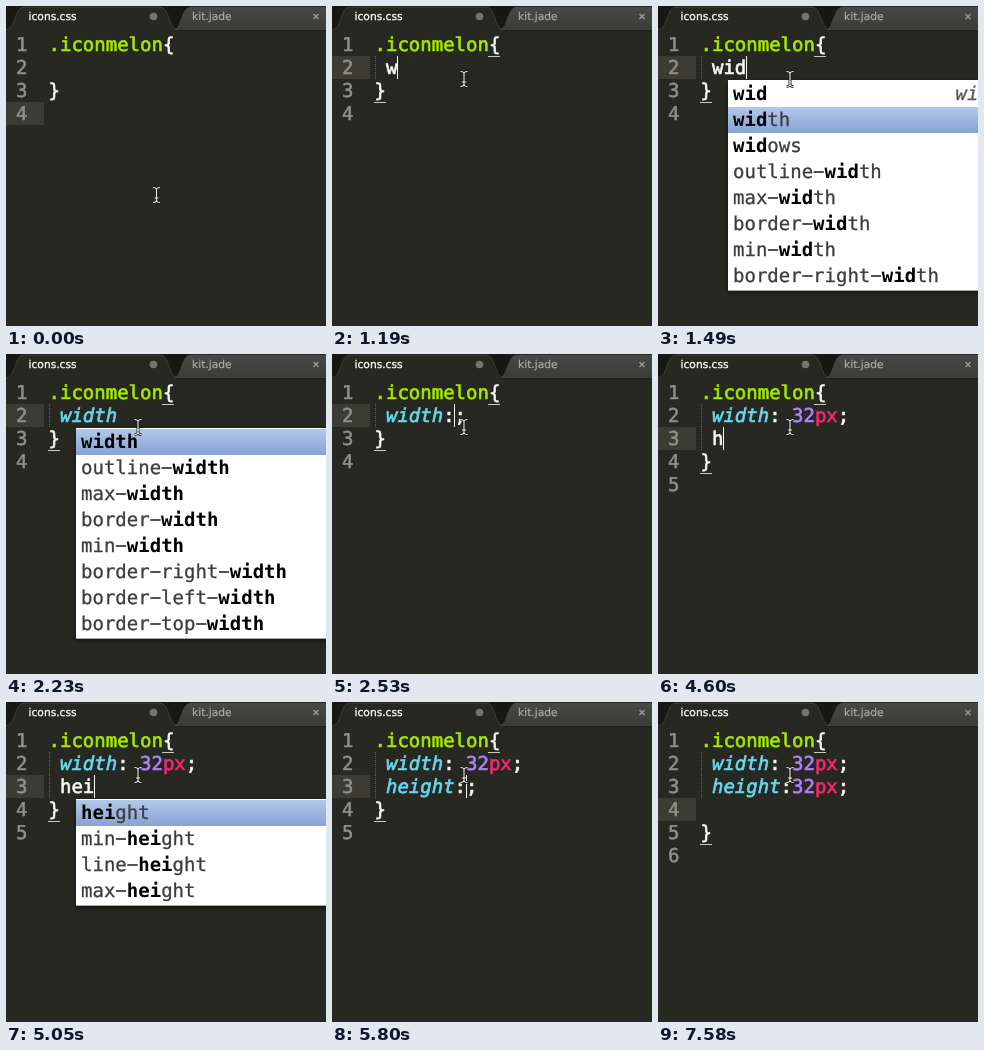
An HTML page that plays this animation: 320x320 px, repeating every 8000 ms.

```html
<!DOCTYPE html>
<html lang="en">
<head>
<meta charset="utf-8">
<title>Typing CSS</title>
<style>
  html, body { margin: 0; width: 100%; height: 100%; overflow: hidden; background: #272822; }
  svg { display: block; width: 100vw; height: 100vh; }
  text { white-space: pre; text-rendering: geometricPrecision; }
  .mono { font-family: "DejaVu Sans Mono", monospace; font-size: 19px; }
  .tab { font-family: "DejaVu Sans", sans-serif; font-size: 10.7px; }
</style>
</head>
<body>
<svg viewBox="0 0 320 320">
  <defs>
    <linearGradient id="idle" x2="0" y2="1">
      <stop offset="0" stop-color="#484946"/><stop offset="1" stop-color="#3b3c38"/>
    </linearGradient>
    <linearGradient id="pick" x2="0" y2="1">
      <stop offset="0" stop-color="#b1c8e9"/><stop offset="1" stop-color="#86a3d4"/>
    </linearGradient>
    <filter id="shade" x="-10%" y="-10%" width="120%" height="130%">
      <feDropShadow dx="0" dy="2" stdDeviation="2.5" flood-color="#000" flood-opacity=".6"/>
    </filter>
    <path id="beam" d="M-3.5 -7.5Q0 -7.5 0 -5V5Q0 7.5 -3.5 7.5M3.5 -7.5Q0 -7.5 0 -5M3.5 7.5Q0 7.5 0 5M-2 3H2"/>
  </defs>
  <rect width="320" height="320" fill="#272822"/>
  <rect width="320" height="24" fill="#171714"/>
  <path d="M168 24C176 23 175 1 185 1H320V24Z" fill="url(#idle)" stroke="#50514b" stroke-width=".6"/>
  <path d="M168 24.5H320" stroke="#1b1b18"/>
  <path d="M0 25C10 23 8 1 18 1H154C164 1 162 23 172 25Z" fill="#272822"/>
  <path d="M0 24C10 23 8 1 18 1H154C164 1 162 23 172 24" fill="none" stroke="#4a4b45" stroke-width=".7"/>
  <text class="tab" x="22.5" y="14" fill="#fff" stroke="#fff" stroke-width=".3">icons.css</text>
  <text class="tab" x="186" y="14" fill="#a9aaa5" stroke="#a9aaa5" stroke-width=".2">kit.jade</text>
  <circle cx="147.5" cy="10.5" r="3.8" fill="#74756f"/>
  <path d="M307.5 8l5 5m0-5l-5 5" stroke="#9a9b95" stroke-width="1.4"/>
  <g id="editor"></g>
  <g id="popup"></g>
  <g id="mouse" fill="none">
    <use href="#beam" stroke="#111" stroke-width="2.6"/>
    <use href="#beam" stroke="#f4f4f0" stroke-width="1.1"/>
  </g>
</svg>
<script>
const LOOP = 8000, ADV = 11.44, LEFT = 42.5, LINE = 23, TOP = 27, BASE = 18, ROW = 26;
const OPEN = ".iconmelon{", WIDTH = " width: 32px;";
const editor = document.getElementById("editor");
const popup = document.getElementById("popup");
const mouse = document.getElementById("mouse");

const widthList = ["width", "outline-width", "max-width", "border-width", "min-width",
  "border-right-width", "border-left-width", "border-top-width"];
const widList = ["wid", "width", "widows", ...widthList.slice(1, 6)];
const heightList = ["height", "min-height", "line-height", "max-height"];
const heList = [...heightList, "white-space", "pitch-range", "speech-rate", "richness"];

// Each step changes only the listed fields; caret is [row, column].
const steps = [
  [0, { rows: [OPEN, "", "}", ""], caret: [3, 0], blink: 0, braces: false, mouse: [150.5, 189], menu: null }],
  [140, { mouse: [132, 73] }],
  [290, { caret: [1, 1], blink: 1, braces: true }],
  [740, { blink: .5 }],
  [890, { blink: 0 }],
  [1190, line2(" w", 2)],
  [1490, { ...line2(" wid", 4), ...menu(widList, "wid", 1) }],
  [1790, { ...line2(" widt", 5), ...menu(widthList, "widt") }],
  [1940, { ...line2(" width", 6), ...menu(widthList, "width") }],
  [2230, { blink: 0 }],
  [2530, { ...line2(" width:;", 7), menu: null }],
  [2830, line2(" width: ;", 8)],
  [2980, line2(" width: 3;", 9)],
  [3130, line2(" width: 32;", 10)],
  [3420, line2(" width: 32p;", 11)],
  [3570, line2(WIDTH, 12)],
  [3720, line2(WIDTH, 13)],
  [4010, { blink: 0 }],
  [4160, line3("", 1)],
  [4450, { blink: 0 }],
  [4600, line3(" h", 2)],
  [4750, { ...line3(" he", 3), ...menu(heList, "he") }],
  [5050, { ...line3(" hei", 4), ...menu(heightList, "hei") }],
  [5200, { ...line3(" heig", 5), ...menu(heightList, "heig") }],
  [5350, { ...line3(" height", 7), ...menu(heightList, "height") }],
  [5650, { ...line3(" height:", 8), menu: null }],
  [5800, line3(" height:;", 8)],
  [6100, line3(" height:3;", 9)],
  [6250, line3(" height:32;", 10)],
  [6540, line3(" height:32p;", 11)],
  [6690, line3(" height:32px;", 12)],
  [6840, line3(" height:32px;", 13)],
  [7130, { blink: 0 }],
  [7280, { rows: [OPEN, WIDTH, " height:32px;", "", "}", ""], caret: [3, 1], blink: 1 }],
  [7580, { blink: 0 }]
];

function line2(text, col) {
  return { rows: [OPEN, text, "}", ""], caret: [1, col], blink: 1 };
}

function line3(text, col) {
  return { rows: [OPEN, WIDTH, text, "}", ""], caret: [2, col], blink: 1 };
}

function menu(list, query, picked = 0) {
  return { menu: { list, query, picked } };
}

function rect(x, y, w, h, fill, extra = "") {
  return `<rect x="${x}" y="${y}" width="${w}" height="${h}" fill="${fill}" ${extra}/>`;
}

function mono(x, y, str, fill, weight = 0, extra = "") {
  return `<text class="mono" x="${x}" y="${y}" fill="${fill}" stroke="${fill}" stroke-width="${weight}" ${extra}>${str}</text>`;
}

function tokenStyle(token) {
  if (token[0] === ".") return ["#a6e800"];
  if (/^(width|height)$/.test(token)) return ["#66d9ef", 'font-style="italic"'];
  if (/^\d/.test(token)) return ["#ae81ff"];
  if (token === "px") return ["#f92672"];
  return ["#f8f8f2"];
}

function drawCode(text, y) {
  return [...text.matchAll(/\.\w+|\d+|[a-z]+|[^\s\w]/g)].map(m => {
    const [fill, extra] = tokenStyle(m[0]);
    return mono(LEFT + m.index * ADV, y, m[0], fill, .65, extra);
  }).join("");
}

function drawEditor(s) {
  const [caretRow, caretCol] = s.caret;
  let out = rect(0, TOP + caretRow * LINE, 38, LINE, "#3c3c33");
  s.rows.forEach((text, i) => {
    const top = TOP + i * LINE, base = top + BASE;
    out += mono(10, base, i + 1, "#8f908a", .55);
    if (text[0] === " ") {
      out += `<path d="M43.5 ${top}v${LINE}" stroke="#62635a" stroke-dasharray="1 1"/>`;
    }
    out += drawCode(text, base);
    const brace = text.search(/[{}]/);
    if (s.braces && brace >= 0) {
      out += rect(Math.floor(LEFT + brace * ADV), top + LINE, 12, 1, "#c9c9c3");
    }
  });
  const x = Math.floor(LEFT + caretCol * ADV);
  return out + rect(x, TOP + caretRow * LINE, 1, LINE, "#f8f8f0", `opacity="${s.blink}"`);
}

// A run of the query is emphasised if there is one, else its letters in order.
function matched(word, query) {
  const at = word.indexOf(query), hits = new Set();
  if (at >= 0) {
    for (let i = 0; i < query.length; i++) hits.add(at + i);
  } else {
    let pos = -1;
    for (const ch of query) hits.add(pos = word.indexOf(ch, pos + 1));
  }
  return hits;
}

function drawWord(word, query, y) {
  const hits = matched(word, query);
  const spans = [...word].map((ch, i) => {
    const glyph = ch === "-" ? "−" : ch;
    return hits.has(i) ? `<tspan font-weight="bold" fill="#000" stroke="none">${glyph}</tspan>` : glyph;
  }).join("");
  return mono(75, y, spans, "#3d3d3d", .3);
}

function drawMenu(s) {
  if (!s.menu) return "";
  const { list, query, picked } = s.menu;
  const top = TOP + (s.caret[0] + 1) * LINE + 1;
  let out = rect(70, top, 270, list.length * ROW + 2.5, "#fff", 'filter="url(#shade)"');
  list.forEach((word, i) => {
    const y = top + 1 + i * ROW;
    if (i === picked) out += rect(70, y, 250, ROW, "url(#pick)");
    out += drawWord(word, query, y + 19);
    if (word === "wid") out += mono(297.5, y + 19, "width", "#555", .3, 'font-style="italic"');
  });
  return out;
}

let shown = -1;
function render(time) {
  const t = time % LOOP;
  const index = steps.filter(step => step[0] <= t).length - 1;
  if (index !== shown) {
    shown = index;
    const s = Object.assign({}, ...steps.slice(0, index + 1).map(step => step[1]));
    editor.innerHTML = drawEditor(s);
    popup.innerHTML = drawMenu(s);
    mouse.setAttribute("transform", `translate(${s.mouse})`);
  }
}

const start = performance.now();
function tick() {
  render(performance.now() - start);
  requestAnimationFrame(tick);
}
tick();
</script>
</body>
</html>
```
